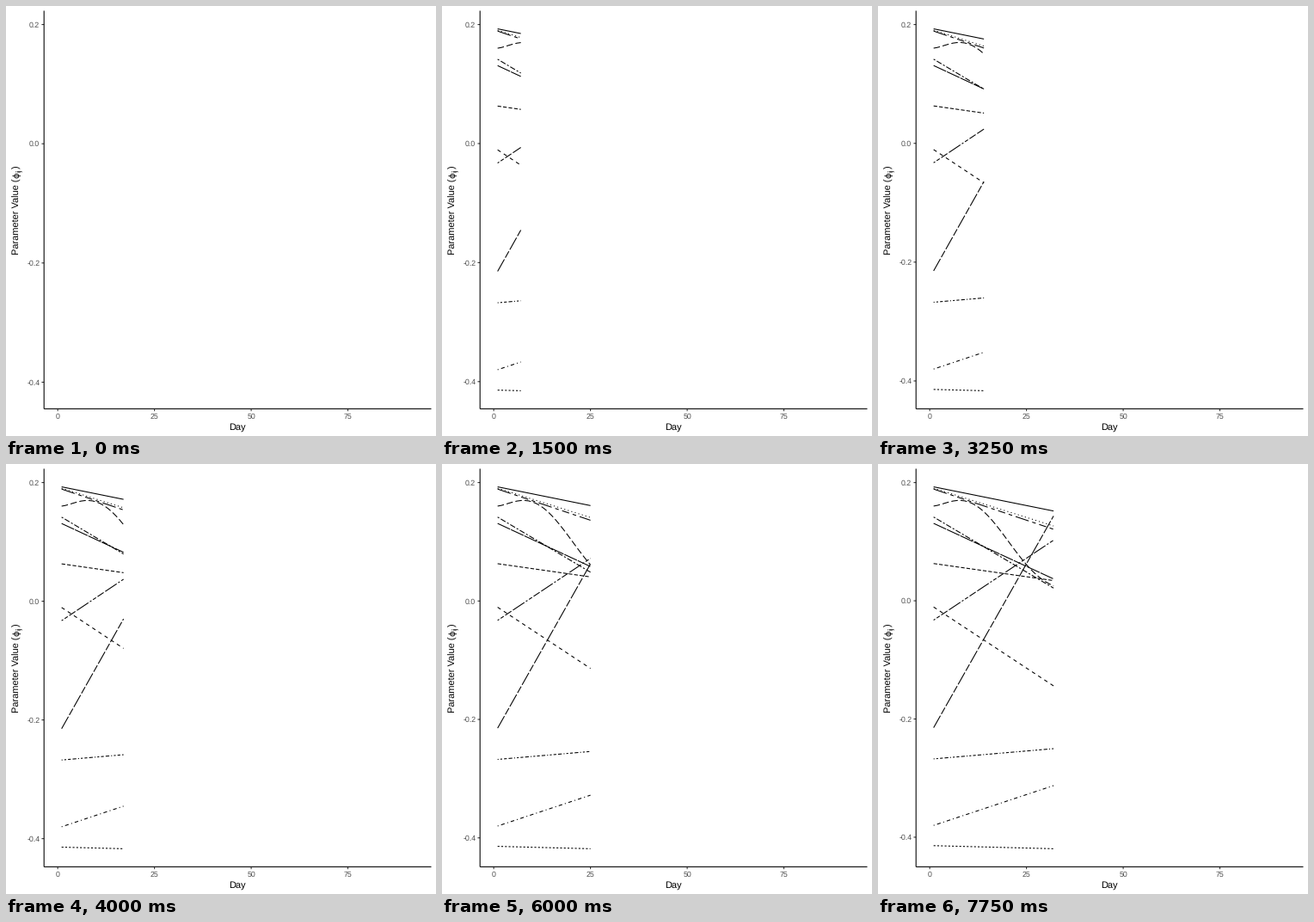
These frames come from a looping animation (500x500 px, 8 s). A matplotlib script:

```python
import numpy as np
import matplotlib.pyplot as plt
from matplotlib.animation import FuncAnimation

plt.rcParams.update({
    "font.family": "Liberation Sans",
    "text.hinting": "none",
    "path.snap": False,
})

SIZE, DPI = 500, 72
FRAMES, INTERVAL = 32, 250
LEFT, RIGHT, TOP, BOTTOM = 44.2, 494.5, 5.5, 468.4
LINE = 1.07
LAST_DAY = 92
PAD = 0.05 / 1.1  # share of the panel left free at each end

# dash pattern in hex digits, value on day 1, value on day 32
TRENDS = [
    ("", 0.1928, 0.1519),
    ("22", -0.4143, -0.4195),
    ("42", 0.0630, 0.0342),
    ("44", -0.0105, -0.1440),
    ("13", 0.1905, 0.1266),
    ("1343", -0.3800, -0.3127),
    ("2262", 0.1417, 0.0215),
    ("12223242", -0.2675, -0.2502),
    ("F282", -0.2147, 0.1435),
    ("F4448444", 0.1890, 0.1210),
    ("224282F2", -0.0327, 0.1025),
    ("F1", 0.1310, 0.0370),
]
BEND_DAYS = [1, 4, 8, 10, 13, 17, 21, 25, 28, 32]
BEND_VALUES = [0.160, 0.166, 0.169, 0.1675, 0.156, 0.130,
               0.0945, 0.060, 0.0425, 0.025]

days = np.arange(1, FRAMES + 1)


def bent_curve():
    fit = np.polyfit(np.array(BEND_DAYS) / FRAMES, BEND_VALUES, 5)
    return np.polyval(fit, days / FRAMES)


def dash_style(code):
    return (0, [int(c, 16) for c in code]) if code else "-"


def x_pixel(day):
    width = RIGHT - LEFT
    return LEFT + width * (PAD + (1 - 2 * PAD) * (day - 1) / (LAST_DAY - 1))


def y_pixel(value, low, high):
    height = BOTTOM - TOP
    return TOP + height * (PAD + (1 - 2 * PAD) * (high - value) / (high - low))


series = np.array([np.linspace(a, b, FRAMES) for _, a, b in TRENDS]
                  + [bent_curve()])
styles = [dash_style(code) for code, _, _ in TRENDS] + [dash_style("73")]

fig = plt.figure(figsize=(SIZE / DPI, SIZE / DPI), dpi=DPI, facecolor="white")
ax = fig.add_axes([0, 0, 1, 1])
ax.set_xlim(0, SIZE)
ax.set_ylim(SIZE, 0)
ax.axis("off")


def stroke(xs, ys, color="black", style="-"):
    return ax.plot(xs, ys, color=color, lw=LINE, ls=style,
                   solid_capstyle="butt", dash_capstyle="butt")[0]


def tick_label(x, y, text, **align):
    return ax.text(x, y, text, size=8.8, color="#4d4d4d", **align)


curves = [stroke([], [], style=style) for style in styles]

y_ticks = []
for value in (-0.4, -0.2, 0.0, 0.2):
    mark = stroke([], [], "#333333")
    label = tick_label(LEFT - 4.95, 0, f"{value:.1f}",
                       ha="right", va="baseline")
    y_ticks.append((value, mark, label))

for day in (0, 25, 50, 75):
    x = x_pixel(day)
    stroke([x, x], [BOTTOM, BOTTOM + 2.75], "#333333")
    tick_label(x, BOTTOM + 11.3, str(day), ha="center", va="baseline")

stroke([LEFT, LEFT], [TOP, BOTTOM])
stroke([LEFT, RIGHT], [BOTTOM, BOTTOM])

ax.text((LEFT + RIGHT) / 2, 493, "Day", size=11, ha="center", va="baseline")


def side_text(x, y, text, size=11, font="Liberation Sans"):
    ax.text(x, y, text, size=size, family=font, rotation=90,
            ha="left", va="baseline", rotation_mode="anchor")


side_text(15.4, 289, "Parameter Value (")
side_text(15.4, 199.7, "\u03d5", 10, "DejaVu Sans")
side_text(18, 193.4, "ij", 7.7)
side_text(15.4, 189.4, ")")


def update(frame):
    shown = series[:, :frame + 1]
    low, high = shown.min(), shown.max()
    xs = x_pixel(days[:frame + 1])
    for curve, values in zip(curves, shown):
        curve.set_data(xs, y_pixel(values, low, high))
        curve.set_visible(frame > 0)
    for value, mark, label in y_ticks:
        y = y_pixel(value, low, high)
        mark.set_data([LEFT - 2.75, LEFT], [y, y])
        label.set_y(y + 3.15)
    return curves


anim = FuncAnimation(fig, update, frames=FRAMES, interval=INTERVAL,
                     repeat=True, repeat_delay=0, blit=False)
plt.show()
```
